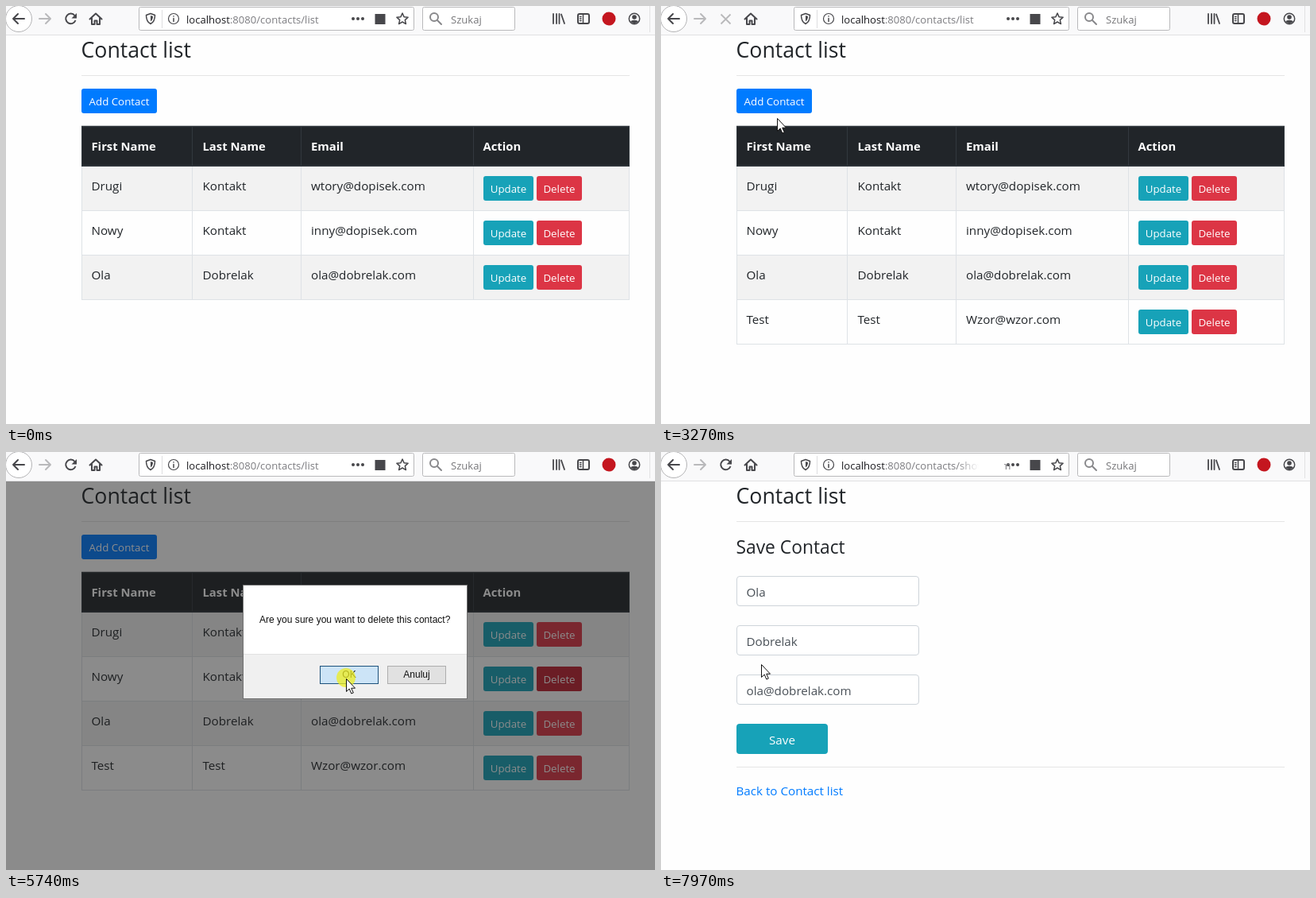
An HTML page for the animation above (8000 ms loop, 817x526 px).

```html
<!DOCTYPE html>
<html lang="en">
<head>
<meta charset="utf-8">
<title>Contact list</title>
<style>
  html, body { margin: 0; width: 100%; height: 100%; overflow: hidden; background: #fefefe; }
  svg { display: block; width: 817px; height: 526px; }
  text { font-family: "Open Sans", "Noto Sans", sans-serif; white-space: pre; }
  .dialog text { font-family: "Liberation Sans", Arial, sans-serif; }
  .icon { fill: none; stroke: #47474b; stroke-width: 2; stroke-linecap: round; stroke-linejoin: round; }
</style>
</head>
<body>
<svg viewBox="0 0 817 526">
  <defs>
    <linearGradient id="fade">
      <stop offset="0" stop-color="#fff" stop-opacity="0"/>
      <stop offset="1" stop-color="#fff"/>
    </linearGradient>
  </defs>
  <g id="page"></g>
  <g id="chrome">
    <rect width="817" height="37" fill="#f9f9fa"/>
    <path d="M0 36.5H817M810.5 0V33" stroke="#e1e1e2"/>
    <circle cx="16" cy="16" r="16.5" fill="#fff" stroke="#b4b4b6"/>
    <rect x="167.5" y="1.5" width="346" height="29" rx="2" fill="#fff" stroke="#b9b9bb"/>
    <rect x="524.5" y="1.5" width="116" height="29" rx="2" fill="#fff" stroke="#b9b9bb"/>
    <path d="M196.5 5V28" stroke="#dedee0"/>
    <g class="icon">
      <path d="M23 16H9M15 10L9 16L15 22"/>
      <path d="M42 16H56M50 10L56 16L50 22" stroke="#b9b9bb"/>
      <path d="M105.5 16.5L113 9.5L120.5 16.5M108 15V23H111.5V18.5H114.5V23H118V15"/>
      <g stroke-width="1.5">
        <path d="M176.500 11.500L182 9.500L187.500 11.500C187.500 17 186 20.500 182 22.500C178 20.500 176.500 17 176.500 11.500Z"/>
        <path d="M182 12V19.500C184 18 185 16 185 13Z" fill="#47474b" stroke="none"/>
        <circle cx="211" cy="16" r="6.500" stroke-width="1.200"/>
        <path d="M211 15.500V19.500M211 12.800V13"/>
        <path id="star"/>
        <circle cx="539" cy="14" r="5" stroke="#88888b" stroke-width="2"/>
        <path d="M543 18L548 23" stroke="#88888b" stroke-width="2"/>
        <path d="M689 10V22M693 10V22M696.500 10V22M699 10.500L703 22" stroke-width="1.800"/>
        <rect x="720" y="10" width="14" height="12" rx="2" stroke-width="2"/>
        <path d="M726.500 10V22M722.500 13.500H724M722.500 16H724M722.500 18.500H724"/>
        <circle cx="791" cy="16" r="6.700"/>
      </g>
    </g>
    <g fill="#47474b">
      <circle cx="437" cy="16" r="2"/><circle cx="443" cy="16" r="2"/><circle cx="449" cy="16" r="2"/>
      <rect x="464.500" y="10" width="13" height="13"/>
      <circle cx="791" cy="14" r="2.800"/>
      <path d="M786 20C787 17 795 17 796 20L791 22.500Z"/>
    </g>
    <circle cx="759" cy="16" r="8.500" fill="#c4161f"/>
    <text x="560" y="21.500" font-size="13.100" fill="#77777a">Szukaj</text>
  </g>
  <g id="bar"></g>
  <g id="overlay"></g>
</svg>
<script>
const LOOP = 8000;
const $ = id => document.getElementById(id);
const between = (t, a, b) => t >= a && t < b;
const clamp = v => Math.max(0, Math.min(1, v));

// Screen updates come in bursts: first, last, count.
const bursts = [
  [140, 540, 6], [690, 1000, 5], [1150, 1640, 7], [1790, 2020, 4], [2170, 2260, 2],
  [2560, 2650, 2], [3030, 3790, 11], [3880, 4580, 10], [4960, 5190, 4], [5420, 5570, 3],
  [5740, 6430, 10], [6600, 6880, 5], [7130, 7900, 11], [7970, 7970, 1]
];
const ticks = [0];
for (const [a, b, n] of bursts)
  for (let i = 0; i < n; i++) ticks.push(a + (n > 1 ? (b - a) * i / (n - 1) : 0));

// Pointer stops: time, x, y.
const route = [
  [140, 150, 157], [460, 146, 128], [690, 146, 128], [850, 146, 141], [3316, 146, 141],
  [4580, 630, 342], [4880, 630, 342], [5190, 684, 307], [5420, 688, 291], [5490, 688, 291],
  [5735, 428, 285], [5980, 428, 285], [6880, 621, 288], [7210, 621, 288], [7890, 126, 249],
  [7965, 126, 267]
];

const contacts = [
  ["Drugi", "Kontakt", "wtory@dopisek.com"],
  ["Nowy", "Kontakt", "inny@dopisek.com"],
  ["Ola", "Dobrelak", "ola@dobrelak.com"],
  ["Test", "Test", "Wzor@wzor.com"]
];

const text = (x, y, size, fill, s, extra = "") =>
  `<text x="${x}" y="${y}" font-size="${size}" fill="${fill}" ${extra}>${s}</text>`;
const rect = (x, y, w, h, fill, extra = "") =>
  `<rect x="${x}" y="${y}" width="${w}" height="${h}" fill="${fill}" ${extra}/>`;
const line = (d, color, width = 1) =>
  `<path d="${d}" fill="none" stroke="${color}" stroke-width="${width}"/>`;
const middle = 'text-anchor="middle"';

// Eased 0..1..0 weight for hover and focus.
const glow = (t, a, b) => clamp((t - a) / 150) - clamp((t - b) / 150);
const ring = (x, y, w, h, color, k) => k > 0
  ? rect(x - 1.5, y - 1.5, w + 3, h + 3, "none", `rx="5" stroke="${color}" stroke-width="3" opacity="${k}"`)
  : "";

function button(x, y, w, label, color, hover = "", k = 0) {
  return rect(x, y, w, 31, color, 'rx="3"') +
    (k > 0 ? rect(x, y, w, 31, hover, `rx="3" opacity="${k}"`) : "") +
    text(x + w / 2, y + 21, 13.3, "#fff", label, middle);
}

function heading() {
  return text(94.5, 65, 26.7, "#212529", "Contact list") + line("M95 87.5H785", "#e5e5e5");
}

function list(t) {
  const late = t >= 5980;
  const rows = late ? contacts.filter((_, i) => i !== 1) : contacts.slice(0, t < 3110 ? 3 : 4);
  const edge = late ? 587.5 : 588.5;
  const bx = late ? 600 : 601;
  const bottom = 201.5 + rows.length * 56;
  let s = button(95, 104, 95, "Add Contact", "#007bff", "#0069d9", glow(t, 330, 690));

  rows.forEach((row, i) => {
    const y = 202 + i * 56;
    s += rect(95, y, 690, 56, i % 2 ? "#fefefe" : "#f2f2f2") + line(`M95 ${y + 55.5}H785`, "#dee2e6");
    [107.5, 247.5, 384].forEach((x, c) => s += text(x, y + 30, 15.2, "#212529", row[c]));
    const hot = i === 2 ? glow(t, 4250, 4900) : i === 1 ? glow(t, 6660, 7210) : 0;
    s += button(bx, y + 12, 63, "Update", "#17a2b8", "#138496", hot);
    const pressed = i === 1 && between(t, 5420, 5980);
    if (pressed && t < 5480) s += ring(668, y + 12, 57, 31, "#f0a9b0", 1);
    s += button(668, y + 12, 57, "Delete", "#dc3545", "#bd2130", +pressed);
  });

  const cols = [95.5, 234.5, 371.5, edge, 784.5];
  s += line(cols.map(x => `M${x} 202V${bottom + .5}`).join(""), "#dee2e6");
  s += rect(95, 151, 690, 51, "#212529") + line("M95 151.5H785M95 201H785", "#32383e", 1.5) +
    line(cols.map(x => `M${x} 151V201`).join(""), "#32383e");
  ["First Name", "Last Name", "Email", "Action"].forEach((h, i) =>
    s += text([107.5, 247.5, 384, 600.5][i], 182, 14.8, "#fff", h, 'font-weight="700"'));
  return s;
}

function field(y, value, hint, k) {
  return ring(95, y, 230, 38, "#bfdeff", k) +
    rect(95.5, y + .5, 229, 37, "#fff", 'rx="3.500" stroke="#ced4da"') +
    (k > 0 ? rect(95.5, y + .5, 229, 37, "none", `rx="3.500" stroke="#80bdff" opacity="${k}"`) : "") +
    text(107.5, y + 26, 15.2, value ? "#495057" : "#7b8289", value || hint) +
    (k > 0 && k < 1 && !value ? line(`M108.5 ${y + 9}V${y + 30}`, "#333") : "");
}

function form(t) {
  const edit = t >= 7130;
  const typed = (s, start, step) => s.slice(0, Math.max(0, Math.floor((t - start) / step) + 1));
  const person = contacts[edit ? 2 : 3];
  const values = edit ? person : [
    typed(person[0], 1145, 80),
    typed(person[1], 1785, 50),
    t < 2170 ? "" : t < 2560 ? person[2][0] : person[2]
  ];
  const focus = edit ? [0, 0, 0, 0] : [
    glow(t, 850, 1450), glow(t, 1430, 1900), glow(t, 1900, 2500), glow(t, 2500, 9000)
  ];
  let s = text(94.5, 128, 22.8, "#212529", "Save Contact");
  ["First name", "Last name", "Email"].forEach((hint, i) =>
    s += field(156 + i * 62, values[i], hint, focus[i]));
  s += ring(95, 342, 115, 38, "#9cd5df", focus[3]) + rect(95, 342, 115, 38, "#17a2b8", 'rx="4"') +
    rect(95, 342, 115, 38, "#138496", `rx="4" opacity="${focus[3]}"`) +
    text(152.5, 368, 15.2, "#fff", "Save", middle) + line("M95 396.5H785", "#e5e5e5") +
    text(94.5, 432, 15.2, "#007bff", "Back to Contact list");
  if (between(t, 2170, 2550)) {
    const chosen = t >= 2250;
    s += rect(95.5, 319.5, 230, 24, chosen ? "#0078d7" : "#fff", 'stroke="#bdbdbd"') +
      text(101, 336, 12.5, chosen ? "#fff" : "#222", person[2]);
  }
  return s;
}

function bar(t, onForm) {
  const loading = between(t, 690, 1150) || between(t, 3030, 3600) ||
    between(t, 5900, 6600) || between(t, 7130, 7800);
  const path = onForm ? "showForm" : "list";
  let s = loading
    ? line("M75.5 10.500L87.500 22.500M87.500 10.500L75.500 22.500", "#b9b9bb", 1.8)
    : line("M86.500 12A6.300 6.300 0 1 0 87.500 18", "#47474b", 2) +
      '<path d="M89 9V15.500H82.500Z" fill="#47474b"/>';
  s += text(227, 21.5, 13.1, "#7c7c80", `<tspan fill="#1b1b1f">localhost</tspan>:8080/contacts/${path}`);
  if (onForm) s += rect(373, 5, 27, 23, "url(#fade)") + rect(400, 5, 32, 23, "#fff");
  return s;
}

function dialog(hot) {
  const key = (x, w, label, fill, edge) =>
    rect(x + .5, 269.5, w, 22, fill, `stroke="${edge}"`) +
    text(x + w / 2 + .5, 284, 12, "#111", label, middle);
  return '<g class="dialog">' + rect(0, 37, 817, 489, "#1a1a1a", 'opacity=".5"') +
    rect(298.5, 167.5, 282, 143, "#fff", 'stroke="#707070"') + rect(299, 254, 281, 56, "#f0f0f0") +
    line("M299 254.5H580", "#e2e2e2") +
    text(319, 215, 12.05, "#111", "Are you sure you want to delete this contact?") +
    key(395, 73, "OK", hot ? "#cce4f7" : "#e1e1e1", hot ? "#1d527c" : "#0078d7") +
    key(480, 73, "Anuluj", "#e1e1e1", "#adadad") + "</g>";
}

function pointer(t) {
  if (t < 140) return "";
  let i = 0;
  while (i < route.length - 1 && t >= route[i + 1][0]) i++;
  const [t0, x0, y0] = route[i];
  const [t1, x1, y1] = route[i + 1] || [LOOP, x0, y0];
  const left = 1 - clamp((t - t0) / (t1 - t0));
  const k = 1 - left * left;
  const x = Math.round(x0 + (x1 - x0) * k), y = Math.round(y0 + (y1 - y0) * k);
  const click = between(t, 530, 690) || between(t, 5735, 5900) || between(t, 7130, 7200);
  const hand = between(t, 375, 690) || between(t, 4310, 4960) || between(t, 6660, 7200);
  const shape = hand
    ? "M-2 13V1Q-2-1 0-1T2 1V8Q5.500 7 5.500 9.500Q8.500 8.500 8.500 11Q11 10.500 11 13V16Q11 19 9 21V23H0V21L-5.500 14Q-6.500 11-4 11.500Z"
    : "M.5.5V16.500L4.200 13L6.800 19L9.300 18L6.700 12.200H11.500Z";
  return (click ? `<circle cx="${x}" cy="${y - 1}" r="12" fill="#eeee20" opacity=".75"/>` : "") +
    `<path transform="translate(${x} ${y})" d="${shape}" fill="#fff" stroke="#111" stroke-linejoin="round"/>` +
    (hand ? `<path transform="translate(${x} ${y})" d="M2 8V12M5.500 9.500V12.500M8.500 11V13" stroke="#111"/>` : "");
}

function draw(t) {
  const onForm = between(t, 690, 3105) || t >= 7205;
  $("page").innerHTML = rect(0, 37, 817, 489, "#fefefe") + heading() + (onForm ? form(t) : list(t));
  $("bar").innerHTML = bar(t, onForm);
  $("overlay").innerHTML = (between(t, 5490, 5900) ? dialog(t >= 5735) : "") + pointer(t);
}

$("star").setAttribute("d", "M" + Array.from({ length: 10 }, (_, i) => {
  const r = i % 2 ? 3.5 : 7.5, a = i * Math.PI / 5;
  return `${(499 + r * Math.sin(a)).toFixed(2)} ${(16.5 - r * Math.cos(a)).toFixed(2)}`;
}).join("L") + "Z");

const start = performance.now();
let shown = -1;
function frame() {
  const now = (performance.now() - start) % LOOP;
  let i = ticks.length - 1;
  while (ticks[i] > now) i--;
  if (i !== shown) draw(ticks[shown = i]);
  requestAnimationFrame(frame);
}
frame();
</script>
</body>
</html>
```
